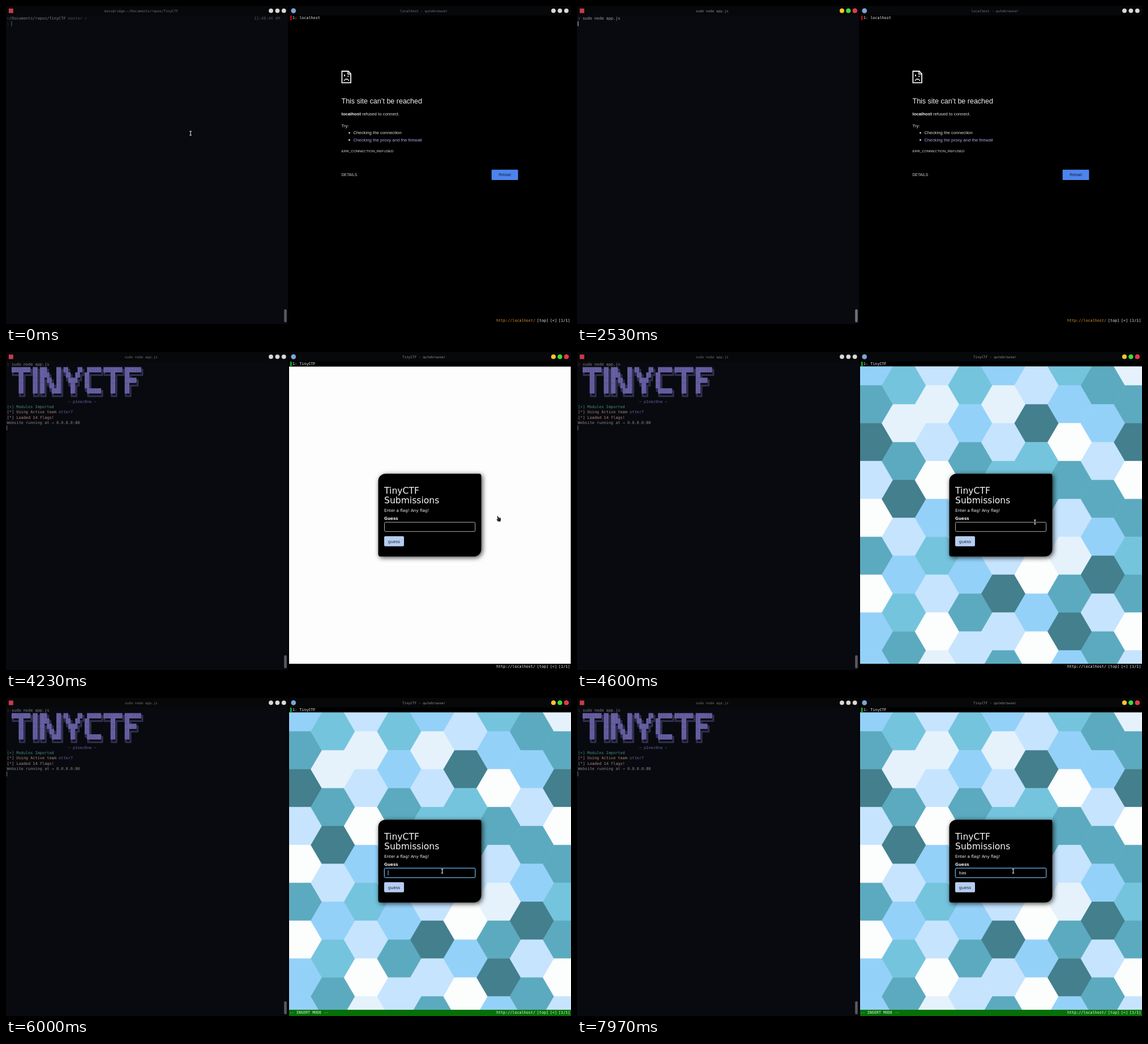
An HTML page with a canvas that plays this animation: 998x561 px, repeating every 8000 ms.

```html
<!DOCTYPE html>
<html lang="en">
<head>
<meta charset="utf-8">
<title>TinyCTF demo</title>
<style>
  html, body { margin: 0; width: 100%; height: 100%; overflow: hidden; background: #000; }
  canvas { display: block; }
</style>
</head>
<body>
<canvas id="stage" width="998" height="561"></canvas>
<script>
const ctx = document.getElementById('stage').getContext('2d');
const LOOP = 8000;
const MONO = '"DejaVu Sans Mono", monospace';
const SANS = '"DejaVu Sans", sans-serif';
const ARIAL = '"Liberation Sans", Arial, sans-serif';

// Terminal grid
const COL = 4.16, ROW = 9.33, LEFT = 1.6, TOP = 17.3;
const TERM_FONT = `6.91px ${MONO}`;
const TITLE_FONT = `6.03px ${MONO}`;
const BAR_FONT = `6.75px ${MONO}`;

// Timeline in ms
const FOCUS_TERM = 250, TYPE_START = 700, KEY_GAP = 105, ENTER = 2420;
const BANNER = 3000, READY = 3100, FOCUS_WEB = 4050, PAGE = 4130;
const HEXES = 4480, INSERT = 4950;
const GUESS_KEYS = [6780, 7060, 7350];
const COMMAND = 'sudo node app.js';

const LOGO = [
  '████████╗██╗███╗   ██╗██╗   ██╗ ██████╗████████╗███████╗',
  '╚══██╔══╝██║████╗  ██║╚██╗ ██╔╝██╔════╝╚══██╔══╝██╔════╝',
  '   ██║   ██║██╔██╗ ██║ ╚████╔╝ ██║        ██║   █████╗',
  '   ██║   ██║██║╚██╗██║  ╚██╔╝  ██║        ██║   ██╔══╝',
  '   ██║   ██║██║ ╚████║   ██║   ╚██████╗   ██║   ██║',
  '   ╚═╝   ╚═╝╚═╝  ╚═══╝   ╚═╝    ╚═════╝   ╚═╝   ╚═╝'
];
// Corner glyph -> horizontal and vertical direction of its arms
const CORNERS = { '╗': [-1, 1], '╔': [1, 1], '╝': [-1, -1], '╚': [1, -1] };

const HEX_COLORS = {
  W: '#fcfdfd', P: '#e5f2fc', L: '#c6e4fd', B: '#94d1f9',
  C: '#74c4dd', T: '#5caabf', D: '#437f8d'
};
// One string per column, read downwards
const HEX_COLUMNS = [
  'BTDLWTWBB', 'CPTDLBCT', 'LPLWBCLWP', 'CBTPLBTL', 'BPLCPLDLT',
  'LDCTLWBW', 'CBWTLPTDB', 'TBLTBDLT', 'PTDWTCTWL'
];

const MOUSE = [
  [0, 326, 224.5], [2950, 326, 224.5], [3630, 738, 236],
  [3850, 870, 291], [4330, 870, 291], [4800, 770.5, 305.5]
];

const clamp = v => Math.max(0, Math.min(1, v));
const ramp = (t, start, length) => clamp((t - start) / length);
const smooth = v => v * v * (3 - 2 * v);

function box(x, y, w, h, color) {
  ctx.fillStyle = color;
  ctx.fillRect(x, y, w, h);
}

function dot(x, y, r, color) {
  ctx.fillStyle = color;
  ctx.beginPath();
  ctx.arc(x, y, r, 0, 7);
  ctx.fill();
}

function text(str, x, y, font, color, align = 'left') {
  ctx.font = font;
  ctx.fillStyle = color;
  ctx.textAlign = align;
  ctx.fillText(str, x, y);
}

function line(points, color, width) {
  ctx.strokeStyle = color;
  ctx.lineWidth = width;
  ctx.beginPath();
  points.forEach(([x, y]) => ctx.lineTo(x, y));
  ctx.stroke();
}

function shape(points, fill, stroke, width) {
  ctx.beginPath();
  points.forEach(([x, y]) => ctx.lineTo(x, y));
  ctx.closePath();
  if (stroke) {
    ctx.strokeStyle = stroke;
    ctx.lineWidth = width;
    ctx.stroke();
  }
  if (fill) {
    ctx.fillStyle = fill;
    ctx.fill();
  }
}

function rounded(x, y, w, h, r, fill, stroke) {
  ctx.beginPath();
  ctx.roundRect(x, y, w, h, r);
  if (fill) {
    ctx.fillStyle = fill;
    ctx.fill();
  }
  if (stroke) {
    ctx.strokeStyle = stroke;
    ctx.lineWidth = 1;
    ctx.stroke();
  }
}

function buttons(x, focus) {
  ['#ffc51f', '#35e32a', '#f0343f'].forEach((color, i) => {
    dot(x + i * 11.4, 8.3, 3.9, '#dad8d6');
    ctx.globalAlpha = focus;
    dot(x + i * 11.4, 8.3, 3.9, color);
    ctx.globalAlpha = 1;
  });
}

function cell(str, col, row, color) {
  text(str, LEFT + col * COL, TOP + row * ROW + 7, TERM_FONT, color);
}

function drawLogo(color) {
  const d = 0.85;
  LOGO.forEach((str, row) => [...str].forEach((ch, col) => {
    const x = LEFT + (col + 2) * COL, y = TOP + (row + 1) * ROW;
    const cx = x + COL / 2, cy = y + ROW / 2;
    if (ch === '█') {
      box(x, y, COL + 0.1, ROW + 0.1, color);
    } else if (ch === '═') {
      for (const s of [-d, d]) line([[x, cy + s], [x + COL, cy + s]], color, 0.7);
    } else if (ch === '║') {
      for (const s of [-d, d]) line([[cx + s, y], [cx + s, y + ROW]], color, 0.7);
    } else if (CORNERS[ch]) {
      const [sx, sy] = CORNERS[ch];
      for (const s of [-d, d]) {
        const px = cx + sx * s, py = cy + sy * s;
        line([[cx + sx * COL / 2, py], [px, py], [px, cy + sy * ROW / 2]], color, 0.7);
      }
    }
  }));
}

function termCursor(t, col, row) {
  const focused = t >= FOCUS_TERM && t < FOCUS_WEB;
  const last = t >= READY ? READY : t >= ENTER ? ENTER : t;
  if (focused && Math.floor((t - last) / 500) % 2) return;
  box(LEFT + col * COL - 0.4, TOP + row * ROW + 0.2, focused ? 1.6 : 1, 8.8, '#85868d');
}

function drawTerminal(t) {
  const focus = ramp(t, FOCUS_TERM, 120) * (1 - ramp(t, FOCUS_WEB, 120));
  const running = t >= ENTER;
  box(0, 0, 499, 561, '#080a0f');
  box(0, 0, 499, 16.5, '#07080a');
  box(498, 0, 2, 561, '#010102');
  box(4.8, 4.5, 8, 8, '#c93a4d');
  ctx.globalAlpha = 0.78 + 0.22 * focus;
  text(running ? COMMAND : 'moss@ridge:~/Documents/repos/TinyCTF',
    238.7, 10.6, TITLE_FONT, '#8d8f8c', 'center');
  rounded(491.2, 535, 4.6, 23, 2, '#6d7075');

  if (!running) {
    cell('~/Documents/repos/TinyCTF', 0, 0, '#939f9c');
    cell('master ↑', 26, 0, '#5d6065');
    text('11:48:44 AM', 484, TOP + 7, TERM_FONT, '#65686c', 'right');
    cell('❯', 0, 1, focus > 0.5 ? '#75408a' : '#4c2436');
    const typed = Math.max(0, Math.min(COMMAND.length, Math.floor((t - TYPE_START) / KEY_GAP) + 1));
    cell(COMMAND.slice(0, typed), 2, 1, '#a1a49f');
    termCursor(t, 2 + typed, 1);
  } else {
    cell('❯', 0, 0, t < BANNER ? '#75408a' : '#5b3048');
    cell(COMMAND, 2, 0, '#a1a49f');
    if (t >= BANNER) {
      drawLogo('#8077cb');
      cell('~ p1nec0ne ~', 26, 7, '#8077cb');
      cell('[+] Modules Imported', 0, 8, '#55b493');
      cell('[*] Using Active team', 0, 9, '#dfaa94');
      cell('otter7', 22, 9, '#8077cb');
      cell('[*] Loaded 14 flags!', 0, 10, '#dfaa94');
    }
    if (t >= READY) cell('Website running at → 0.0.0.0:80', 0, 11, '#a9aca7');
    termCursor(t, 0, t < BANNER ? 1 : t < READY ? 11 : 12);
  }
  ctx.globalAlpha = 1;
  buttons(468, focus);
}

function drawErrorPage() {
  const x = 592.5, white = '#f2f2f2';
  const body = `7.8px ${ARIAL}`;
  shape([[593.4, 115], [604.6, 115], [609, 119.5], [609, 135.4], [593.4, 135.4]], null, white, 1.8);
  line([[604, 115], [604, 120.2], [609, 120.2]], white, 1.6);
  box(597, 121, 1.9, 3, white);
  box(603.3, 123, 1.9, 1.9, white);
  box(598.6, 128.4, 5.6, 1.7, white);
  box(596.8, 130, 1.9, 1.8, white);
  box(604.1, 130, 1.9, 1.8, white);

  text('This site can’t be reached', x, 172.4, `12.5px ${ARIAL}`, white);
  text('localhost', x, 193.2, `bold 7.8px ${ARIAL}`, white);
  const w = ctx.measureText('localhost').width;
  text(' refused to connect.', x + w, 193.2, body, '#dedede');
  text('Try:', x, 213.7, body, '#dedede');
  dot(606.5, 223.8, 1.4, '#dedede');
  dot(606.5, 236.3, 1.4, '#dedede');
  text('Checking the connection', 613.4, 226, body, '#dedede');
  text('Checking the proxy and the firewall', 613.4, 238.7, body, '#a5a7ef');
  text('ERR_CONNECTION_REFUSED', x, 258.3, `6.25px ${ARIAL}`, '#dedede');
  text('DETAILS', x, 300.3, `6.76px ${ARIAL}`, '#d0d0d0');
  rounded(857.7, 288.8, 46.8, 18.2, 1, '#4d84ec');
  text('Reload', 881, 300.3, `6.76px ${ARIAL}`, '#11203c', 'center');
}

function drawHexes() {
  const side = 39.05, half = 33.4;
  HEX_COLUMNS.forEach((column, i) => {
    const cx = 519 + i * side * 1.5;
    [...column].forEach((key, j) => {
      const cy = (i % 2 ? 59 : 25.6) + j * half * 2;
      const color = HEX_COLORS[key];
      shape([
        [cx - side, cy], [cx - side / 2, cy - half], [cx + side / 2, cy - half],
        [cx + side, cy], [cx + side / 2, cy + half], [cx - side / 2, cy + half]
      ], color, color, 0.6);
    });
  });
}

function drawCard(t) {
  const x = 668, white = '#f6f6f6', small = `7.28px ${SANS}`;
  const active = t >= INSERT;
  ctx.save();
  ctx.shadowColor = 'rgba(0,0,0,.75)';
  ctx.shadowBlur = 9;
  ctx.shadowOffsetX = ctx.shadowOffsetY = 2;
  rounded(657.5, 214.8, 182, 146, [13, 4, 13, 4], '#000');
  ctx.restore();
  text('TinyCTF', x, 250, `15.6px ${SANS}`, white);
  text('Submissions', x, 267, `15.6px ${SANS}`, white);
  text('Enter a flag! Any flag!', x, 282, `7.2px ${SANS}`, white);
  text('Guess', x, 295.6, `bold 7.2px ${SANS}`, white);
  if (active) rounded(667.6, 299.4, 162, 18.2, 2.5, null, '#23415c');
  rounded(668.5, 300.3, 160.2, 16.4, 2, '#000', active ? '#6fb4e8' : '#aeb0b3');
  rounded(668, 325, 35, 17.8, 2, '#b5cdf0');
  text('guess', 685.4, 336.6, small, '#17222e', 'center');
  if (!active) return;

  const count = GUESS_KEYS.filter(k => t >= k).length;
  const value = 'bas'.slice(0, count);
  text(value, 674.8, 311.2, small, white);
  const since = t - (count ? GUESS_KEYS[count - 1] : INSERT);
  if (Math.floor(since / 500) % 2 === 0) {
    box(674.6 + ctx.measureText(value).width, 304.2, 0.8, 8.6, white);
  }
}

function drawBrowser(t) {
  const loaded = t >= PAGE, insert = t >= INSERT;
  const focus = ramp(t, FOCUS_WEB, 120);
  box(500, 0, 498, 561, '#000');
  box(500, 0, 498, 16.5, '#07080a');
  dot(507.8, 8.4, 4.3, '#7ca4d6');
  text(loaded ? 'TinyCTF - qutebrowser' : 'localhost - qutebrowser',
    738, 10.6, TITLE_FONT, focus > 0.5 ? '#8d8f8c' : '#73757a', 'center');
  buttons(967, focus);
  box(502, 17, 2.6, 8, loaded ? '#08b81c' : '#c4080c');
  text(loaded ? '1: TinyCTF' : '1: localhost', 506, 23.4, BAR_FONT, '#eeeeee');

  ctx.save();
  ctx.beginPath();
  ctx.rect(500, 25.5, 498, 524.5);
  ctx.clip();
  if (loaded) {
    box(500, 25.5, 497.5, 524.5, '#fdfdfd');
    if (t >= HEXES) drawHexes();
    drawCard(t);
  } else {
    drawErrorPage();
  }
  ctx.restore();

  box(500, 550, 498, 11, insert ? '#067006' : '#000');
  if (insert) text('-- INSERT MODE --', 500.5, 557.4, BAR_FONT, '#eeeeee');
  const hover = t >= 3480 && t < 3690;
  text(hover ? 'chrome-error://chromewebdata/#buttons' : 'http://localhost/', 935, 557.4,
    BAR_FONT, hover ? '#35e0d2' : loaded ? '#eeeeee' : '#d99a2b', 'right');
  text('[top]', 937.8, 557.4, BAR_FONT, '#eeeeee');
  text('[<]', 961, 557.4, BAR_FONT, '#eeeeee');
  text('[1/1]', 976, 557.4, BAR_FONT, '#eeeeee');
}

function mouseAt(t) {
  let i = MOUSE.length - 1;
  while (t < MOUSE[i][0]) i--;
  const [t0, x0, y0] = MOUSE[i];
  const [t1, x1, y1] = MOUSE[i + 1] || [LOOP, x0, y0];
  const k = smooth(ramp(t, t0, t1 - t0));
  return [x0 + (x1 - x0) * k, y0 + (y1 - y0) * k];
}

function drawMouse(t) {
  if (t >= TYPE_START && t < 2950) return;
  const [x, y] = mouseAt(t);
  const overField = t > 4400 && x < 829 && y > 299;
  const overLink = t < PAGE && x > 613 && x < 735 && y > 230 && y < 242;
  const overReload = t > 3700 && t < 4380 && x > 857 && y > 288;
  const at = points => points.map(([px, py]) => [x + px, y + py]);
  if (x < 499 || overField) {
    for (const [color, width] of [['#111', 2.2], ['#f4f4f4', 1]]) {
      line(at([[0, -3.4], [0, 3.4]]), color, width);
      line(at([[-1.8, -3.5], [1.8, -3.5]]), color, width);
      line(at([[-1.8, 3.5], [1.8, 3.5]]), color, width);
    }
  } else if (overLink || overReload) {
    shape(at([[-2.4, -1.5], [-1, -1.5], [0, 1.2], [3.6, 1.8], [4.2, 4], [3.4, 8],
      [-0.6, 8], [-3.4, 5], [-3, 4], [-1.6, 4.4]]), '#26282a', '#d8d8d8', 0.7);
  } else {
    shape(at([[0, 0], [0, 7.6], [1.7, 6.2], [2.8, 9], [4, 8.5], [2.9, 5.8], [5, 5.6]]),
      '#f8f8f8', '#111', 1);
  }
}

function frame(now) {
  const t = now % LOOP;
  drawTerminal(t);
  drawBrowser(t);
  drawMouse(t);
  requestAnimationFrame(frame);
}

const start = performance.now();
(function tick() {
  const t = (performance.now() - start) % LOOP;
  drawTerminal(t);
  drawBrowser(t);
  drawMouse(t);
  requestAnimationFrame(tick);
})();
</script>
</body>
</html>
```
